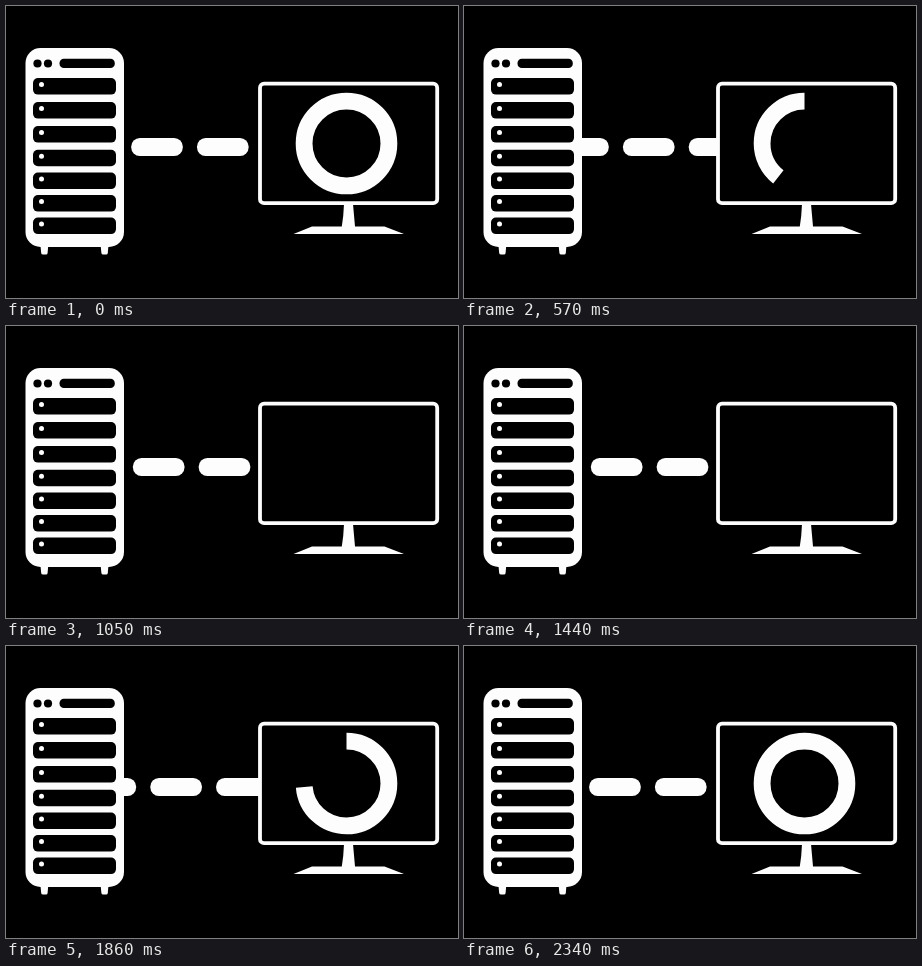
Animation, 452 px wide and 292 px high, one loop 2.37 s. Source, as an HTML page:

```html
<!DOCTYPE html>
<html lang="en">
<head>
<meta charset="utf-8">
<title>Server and monitor</title>
<style>
  html, body { margin: 0; width: 100%; height: 100%; overflow: hidden; background: #000; }
  svg { display: block; width: 452px; height: 292px; }
  .ink { fill: #fdfdfd; }
  .line { fill: none; stroke: #fdfdfd; }
</style>
</head>
<body>
<svg viewBox="0 0 452 292">
  <defs>
    <clipPath id="gap"><rect x="117" y="125" width="137" height="32"/></clipPath>
  </defs>

  <g clip-path="url(#gap)"><g id="dashes" class="ink"></g></g>

  <rect class="ink" x="19.5" y="42" width="98.5" height="199" rx="15"/>
  <path class="ink" d="M34.5 240H42.2L41.6 247Q41.4 248.5 40 248.5H37Q35.4 248.5 35.2 247Z"/>
  <path class="ink" d="M94.7 240H102.4L101.8 247Q101.6 248.5 100.2 248.5H97.2Q95.6 248.5 95.4 247Z"/>
  <circle cx="31.5" cy="57.5" r="4.1"/>
  <circle cx="42" cy="57.5" r="4.1"/>
  <rect x="53.5" y="52.7" width="55.3" height="9.4" rx="4.3"/>
  <g id="slots"></g>

  <rect class="line" x="254" y="77.7" width="177.2" height="119.5" rx="4" stroke-width="3.8"/>
  <path class="ink" d="M338 198H347L349 220.5H378.5L398 228H287.5L306 220.5H335.8Q337.6 210 338 198Z"/>
  <circle id="ring" class="line" cx="340.5" cy="137.5" r="42.4" stroke-width="16.8"
    pathLength="360" transform="rotate(-90 340.5 137.5)"/>
</svg>
<script>
const LOOP = 2370, STEP = 30;
const PITCH = 65.8, FIRST_X = 125.2;
const SHIFT_OUT = 67.5, SHIFT_BACK = 2 * PITCH - SHIFT_OUT;

const $ = id => document.getElementById(id);
const ring = $('ring');

function add(parent, tag, attrs) {
  const el = document.createElementNS('http://www.w3.org/2000/svg', tag);
  for (const key in attrs) el.setAttribute(key, attrs[key]);
  return parent.appendChild(el);
}

for (const y of [72, 96, 120, 143.7, 166.5, 189, 211.5]) {
  add($('slots'), 'rect', { x: 27, y, width: 83, height: 16.6, rx: 5 });
  add($('slots'), 'circle', { cx: 35.5, cy: y + 6.6, r: 2.5, class: 'ink' });
}

const dashes = [-1, 0, 1, 2].map(i =>
  add($('dashes'), 'rect', { x: FIRST_X + i * PITCH, y: 132, width: 51.6, height: 18, rx: 8.6 }));

const progress = (t, start, span) => Math.min(1, Math.max(0, (t - start) / span));

const quartInOut = u => u < 0.5 ? 8 * u ** 4 : 1 - 8 * (1 - u) ** 4;

// Steep ease, cubic-bezier(.77, 0, .175, 1), solved by bisection
function steepInOut(u) {
  if (u <= 0 || u >= 1) return u;
  let lo = 0, hi = 1, s;
  for (let i = 0; i < 24; i++) {
    s = (lo + hi) / 2;
    const x = 2.31 * s * (1 - s) ** 2 + 0.525 * s * s * (1 - s) + s ** 3;
    if (x < u) lo = s; else hi = s;
  }
  return s * s * (3 - 2 * s);
}

function drawRing(from, to) {
  const sweep = to - from;
  ring.style.display = sweep < 0.8 ? 'none' : '';
  const full = sweep > 359.5;
  ring.setAttribute('stroke-dasharray', full ? 'none' : `0 ${from} ${sweep} 400`);
}

function draw(t) {
  const shift = SHIFT_OUT * quartInOut(progress(t, 75, 990))
    + SHIFT_BACK * quartInOut(progress(t, 1435, 990));
  $('dashes').setAttribute('transform', `translate(${shift % PITCH} 0)`);

  if (t < 1200) drawRing(360 * steepInOut(progress(t, 143, 850)), 360);
  else drawRing(0, 360 * steepInOut(progress(t, 1398, 850)));
}

const begin = performance.now();
function tick() {
  const t = Math.max(0, performance.now() - begin) % LOOP;
  draw(Math.floor(t / STEP) * STEP);
  requestAnimationFrame(tick);
}
tick();
</script>
</body>
</html>
```
